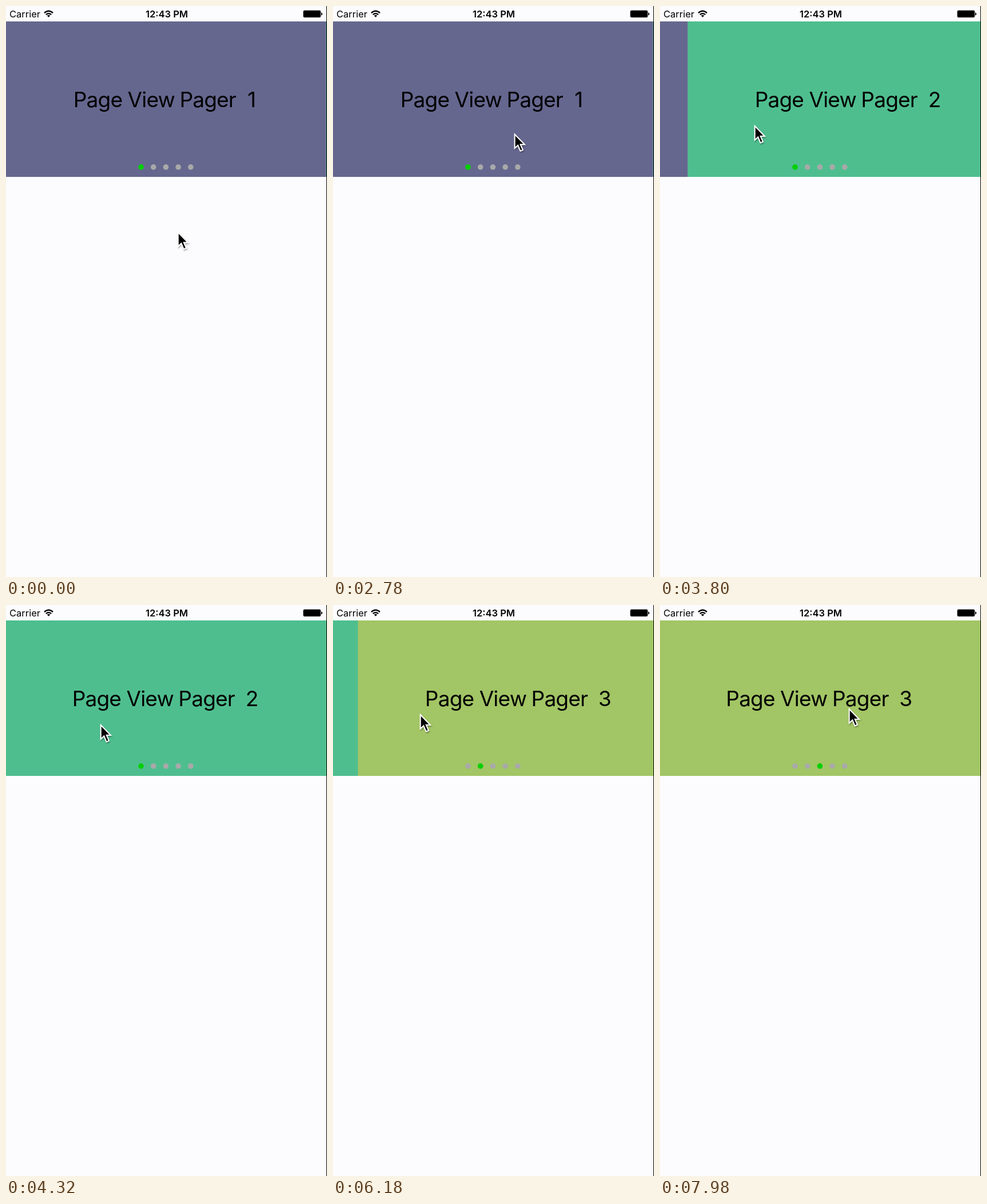
An HTML page that plays this animation: 561 px wide and 999 px high, repeating every 8 s.

```html
<!DOCTYPE html>
<html lang="en">
<head>
<meta charset="utf-8">
<title>Page pager</title>
<style>
  html, body { margin: 0; width: 100%; height: 100%; overflow: hidden; background: #fcfcfe; }
  svg { display: block; width: 100%; height: 100%; }
  text { font-family: Inter, Roboto, sans-serif; fill: #000; }
  .title { font-size: 37px; letter-spacing: -.8px; }
  .bar { font-size: 16.5px; }
</style>
</head>
<body>
<svg viewBox="0 0 561 999">
  <defs>
    <clipPath id="panel"><rect y="27" width="560" height="272"/></clipPath>
    <filter id="shadow" x="-40%" y="-30%" width="200%" height="180%">
      <feDropShadow dx="1" dy="2" stdDeviation="1.2" flood-opacity=".35"/>
    </filter>
  </defs>
  <rect width="561" height="999" fill="#fcfcfe"/>

  <text class="bar" x="6" y="20">Carrier</text>
  <g fill="none" stroke="#000" stroke-width="2.3">
    <path d="M67 12.2Q74.5 5.4 82 12.2"/>
    <path d="M69.8 15.2Q74.5 11 79.2 15.2"/>
  </g>
  <path d="M71.8 16.8Q74.5 14.6 77.2 16.8L74.5 19.8Z"/>
  <text class="bar" x="281" y="20" text-anchor="middle" font-weight="600">12:43 PM</text>
  <rect x="519.5" y="7.8" width="30.6" height="12.2" rx="2.2" fill="#000" stroke="#777" stroke-width=".8"/>
  <path d="M551 11.6Q553 12 553 14T551 16.4Z"/>

  <g clip-path="url(#panel)"><g id="pages"></g></g>
  <g id="dots"></g>
  <rect x="560" width="1" height="999" fill="#000"/>
  <path id="cursor" d="M.7 2V26.4L6.3 21.3L10.6 31.3L14.9 29.4L10.7 19.8H18Z"
    fill="#000" stroke="#fff" stroke-width="2" filter="url(#shadow)"/>
</svg>
<script>
const LOOP = 8000;
const PAGE_X = -2, PAGE_W = 561.5; // pages begin just outside the stage
const $ = id => document.getElementById(id);

function add(parent, tag, attrs, content = '') {
  const el = document.createElementNS('http://www.w3.org/2000/svg', tag);
  for (const key in attrs) el.setAttribute(key, attrs[key]);
  el.textContent = content;
  return parent.appendChild(el);
}

['#66678f', '#4fbe8f', '#a2c565'].forEach((fill, i) => {
  const page = add($('pages'), 'g', { transform: `translate(${i * PAGE_W})` });
  add(page, 'rect', { x: PAGE_X, y: 27, width: PAGE_W + 0.5, height: 272, fill });
  const left = i ? 115.3 : 117.7;
  const title = add(page, 'text', { class: 'title', y: 177.3 });
  [['Page', 0], ['View', 94.8], ['Pager', 185.7]].forEach(([word, dx]) =>
    add(title, 'tspan', { x: left + dx }, word));
  add(page, 'text', { class: 'title', x: 429.2, y: 177.3, 'text-anchor': 'middle' }, i + 1);
});

const dots = Array.from({ length: 5 }, (_, i) =>
  add($('dots'), 'circle', { cx: 236 + i * 21.7, cy: 281.8, r: 4.8 }));

const linear = u => u;
const smooth = u => u * u * (3 - 2 * u);

// Pointer stops: time, x, y, easing used to get there
const stops = [
  [0, 300, 394, linear],
  [300, 300, 394, linear],
  [1100, 264, 392, smooth],
  [2160, 264, 392, linear],
  [2800, 317, 222, smooth],
  [3120, 317, 218, smooth],
  [3480, 165, 208, linear],
  [4560, 165, 208, linear],
  [5250, 336.5, 200, smooth],
  [5520, 336.5, 200, linear],
  [5860, 156, 190, linear],
  [5960, 152, 190, smooth],
  [6960, 152, 190, linear],
  [7760, 330, 180, smooth],
  [LOOP, 330, 180, linear]
];

// Each swipe follows the pointer, then springs to the next page
const swipes = [
  { start: 3120, end: 3480, grab: 317, dist: 152, settled: 4420 },
  { start: 5520, end: 5860, grab: 336.5, dist: 180.5, settled: 6800 }
];

function pointer(t) {
  const n = Math.max(1, stops.findIndex(s => s[0] > t));
  const [t0, x0, y0] = stops[n - 1];
  const [t1, x1, y1, ease] = stops[n];
  const u = ease((t - t0) / (t1 - t0));
  return [x0 + (x1 - x0) * u, y0 + (y1 - y0) * u];
}

function travel(s, t, x) {
  if (t < s.start) return 0;
  if (t <= s.end) return s.grab - x;
  if (t >= s.settled) return PAGE_W;
  const dt = t - s.end, w = 0.011;
  const rest = PAGE_W - s.dist;
  const v = s.dist / (s.end - s.start);
  return PAGE_W - (rest + (w * rest - v) * dt) * Math.exp(-w * dt);
}

function draw(t) {
  const [x, y] = pointer(t);
  const offset = swipes.reduce((sum, s) => sum + travel(s, t, x), 0);
  const current = swipes.filter(s => t >= s.settled).length;
  $('cursor').setAttribute('transform', `translate(${x} ${y})`);
  $('pages').setAttribute('transform', `translate(${-offset})`);
  dots.forEach((dot, i) => dot.setAttribute('fill', i === current ? '#00d000' : '#a9a9a9'));
}

const begin = performance.now();
function tick() {
  draw((performance.now() - begin) % LOOP);
  requestAnimationFrame(tick);
}
tick();
</script>
</body>
</html>
```
